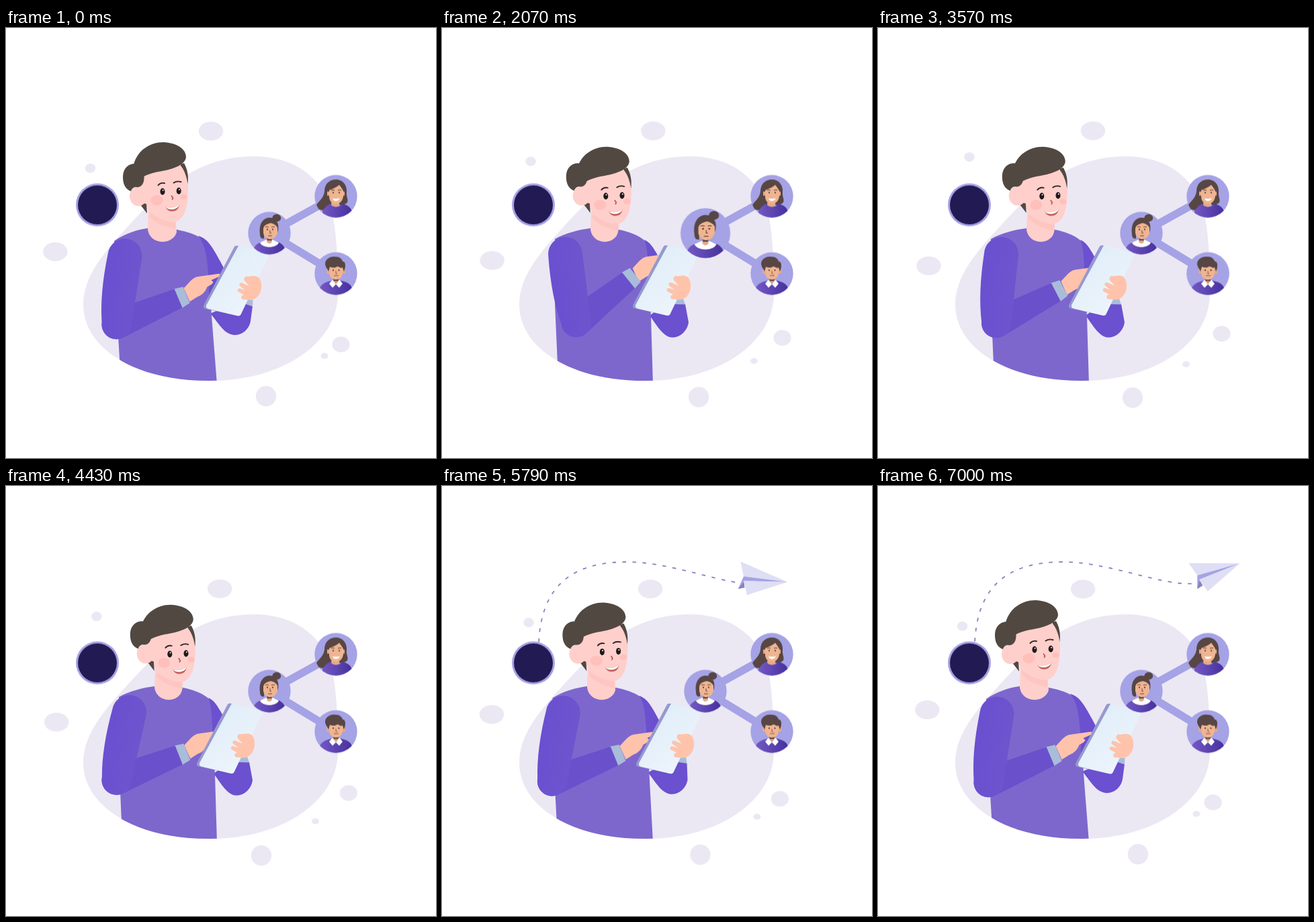
These frames come from a looping animation (640x640 px, 7.21 s). An HTML page:

```html
<!DOCTYPE html>
<html lang="en">
<head>
<meta charset="utf-8">
<title>Sharing</title>
<style>
html, body { margin: 0; width: 100%; height: 100%; overflow: hidden; background: #fff; }
svg { display: block; width: 100%; height: 100%; }
.bubble { animation: drift 3605ms cubic-bezier(.37, 0, .63, 1) infinite alternate; }
.pulse { animation: pulse 7210ms ease-in-out infinite; }
.dip { animation: dip 7210ms ease-in-out infinite; }
@keyframes drift { to { transform: translate(var(--x), var(--y)); } }
@keyframes pulse { 0%, 25.4%, 32.3%, 100% { transform: scale(1); } 28.8% { transform: scale(1.17); } }
@keyframes dip { 0%, 63%, 72.5%, 100% { transform: scale(1); } 67% { transform: scale(.93); } }
</style>
</head>
<body>
<svg viewBox="0 0 640 640">
  <defs>
    <path id="blob" d="M368 191C430 191 464 222 481 258C492 290 494 345 494 395C494 470 410 525 305 525C190 526 115 475 115 412C115 370 145 335 180 297C235 235 290 191 368 191Z"/>
    <clipPath id="floor"><use href="#blob"/><rect width="640" height="420"/></clipPath>
    <clipPath id="disc"><circle r="31.7"/></clipPath>
    <linearGradient id="shirt"><stop offset=".1" stop-color="#7055c2"/><stop offset="1" stop-color="#45309c"/></linearGradient>
    <linearGradient id="glass" x1="0" y1="0" x2=".7" y2="1"><stop offset="0" stop-color="#dcebf8"/><stop offset=".35" stop-color="#e3eff9"/><stop offset="1" stop-color="#edf4fc"/></linearGradient>
    <linearGradient id="sleeve"><stop offset="0" stop-color="#6a50d0"/><stop offset="1" stop-color="#6e54cd"/></linearGradient>
    <mask id="flown" maskUnits="userSpaceOnUse" x="0" y="0" width="640" height="640">
      <path id="reveal" fill="none" stroke="#fff" stroke-width="6"/>
    </mask>
  </defs>

  <g fill="#ebe8f4">
    <use href="#blob"/>
    <ellipse class="bubble" cx="73.3" cy="333" rx="18.2" ry="14" style="--x:2.2px;--y:21px"/>
    <ellipse class="bubble" cx="305" cy="153.5" rx="18.2" ry="14" style="--x:15px;--y:-.6px"/>
    <ellipse class="bubble" cx="125.5" cy="208.7" rx="7.8" ry="7" style="--x:10.5px;--y:-16.7px"/>
    <ellipse class="bubble" cx="498.5" cy="471" rx="13.1" ry="11.8" style="--x:13px;--y:-16px"/>
    <ellipse class="bubble" cx="474" cy="488" rx="5.6" ry="4.4" style="--x:-15.5px;--y:12.5px"/>
    <circle class="bubble" cx="387" cy="548" r="15.2" style="--x:-8px;--y:2.2px"/>
  </g>

  <path id="trail" d="M144 235C147 152 190 113 275 113C345 113 425 150 471 145" fill="none" stroke="#8583c3" stroke-width="1.8" stroke-dasharray="5.5 9.5" mask="url(#flown)"/>
  <g id="plane">
    <path fill="#dedef4" d="M5-31L74 1.5L9-9Z"/>
    <path fill="#a5a2e6" d="M9-9L74 1.5L9-2L0 9.5Z"/>
    <path fill="#8583c3" d="M0 9.5L10 8L9-2Z"/>
    <path fill="#dedef4" d="M9-2.5L74 1.5L13 19Z"/>
  </g>
  <g transform="translate(136 263.3)">
    <g class="dip"><circle r="32" fill="#a5a2e6"/><circle r="29" fill="#221a52"/></g>
  </g>

  <path id="farSleeve" fill="#6b50cf"/>
  <path id="farCuff" fill="#a9bcd9"/>
  <path id="torso" fill="#7d67cd" clip-path="url(#floor)"/>
  <path id="farShoulder" fill="#6b50cf"/>
  <path id="neck" fill="#ffcfcb"/>

  <g id="face">
    <path fill="#fdc6c1" d="M214 274C226 284 240 289 252 288L252 299C238 297 222 290 213 280Z"/>
    <path fill="#ffcfcb" d="M195 222L264 203C269 212 271.500 226 271 243C270.500 264 267 282 254 288C240 292 221 281 209 265L200 250Z"/>
  </g>
  <g id="nape">
    <path fill="#524842" d="M196 258L210 276L209 262Z"/>
    <ellipse cx="197" cy="250.500" rx="13" ry="14.500" fill="#ffcfcb"/>
    <path fill="#524842" d="M190 202C179 203 174 212 174 222C174 233 178 240 186 243C187 239 191 236 195 237C202 237 206 231 205.500 221L205 203Z"/>
  </g>
  <g id="features">
    <path fill="#524842" d="M190 203C196 182 214 170 234 170C256 171 268 181 268 192C267 205 245 211 226 214C217 216 210 218 205 221L194 222ZM260 203L265 201C270 210 272 220 270.500 232C269 222 266 212 260 205Z"/>
    <g fill="#ffbfbb"><ellipse cx="224.500" cy="256.500" rx="9" ry="7.500"/><ellipse cx="264.500" cy="251.500" rx="5.200" ry="4"/></g>
    <g fill="#1f1a1c"><ellipse cx="233" cy="243.500" rx="3.500" ry="5"/><ellipse cx="257.200" cy="242.500" rx="3.500" ry="5"/></g>
    <g fill="#fff"><circle cx="233.700" cy="241.500" r="1"/><circle cx="258" cy="240.500" r="1"/></g>
    <g fill="none" stroke="#2e2623" stroke-width="1.900" stroke-linecap="round">
      <path d="M226.500 234C229 231 232 230 236 231M249.500 230.500C253 228 257 228 260.500 229"/>
      <path stroke="#c0574f" stroke-width="1.800" d="M246.500 250L248.500 253L247.500 255"/>
    </g>
    <path fill="#c4655f" d="M237.500 266C244 269 252 267 257.500 263C258 269 253 273 247 273C242 273 239 270 237.500 266Z"/>
    <path fill="#fff" d="M237.500 266C244 269 252 267 257.500 263C257 267 253 269.500 247 270C242 270 239 268.500 237.500 266Z"/>
  </g>

  <path id="hand" fill="#ffc3ab" d="M-4-10C4-18 8-25 16-27L48-31.500C52-31 51-28 47-26.500L37-22L40-19C38-15 34-14 31-12C28-4 22 1 16 3L5 10Z"/>
  <g id="forearm">
    <path fill="#a9bcd9" d="M99-15.500L113-13V13L99 15.500Z"/>
    <path fill="#6b50cc" d="M0-22L100-15V15L0 22A22 22 0 0 1 0-22Z"/>
  </g>
  <path id="upperArm" fill="url(#sleeve)" d="M-25.500 0A25.500 25.500 0 0 1 25.500 0L22 103A22 22 0 0 1-22 103Q-30.500 60-25.500 0Z"/>

  <g id="phone" stroke-linejoin="round" stroke-width="8">
    <path fill="#9599cf" stroke="#9599cf" d="M343 328L384 338L344 424L298 414Z"/>
    <path fill="url(#glass)" stroke="url(#glass)" d="M348.500 328L387 338L346 424.500L302 414Z"/>
    <path fill="#ffc3ab" d="M368 369C376 368 381 375 380 387C379 397 372 405 363 405L352 404C349 402 350 398 354 397L346 393C343 390 345 387 349 388L356 390L348 384C346 380 349 378 353 380L362 384L355 376C353 372 357 368 360 370Z" stroke="none"/>
  </g>

  <path d="M491 250.500L392 305.300L491 365.500" fill="none" stroke="#a5a2e6" stroke-width="11.500"/>

  <g transform="translate(491 250.500)"><g class="pulse" style="animation-delay:880ms">
    <circle r="31.700" fill="#a5a2e6"/>
    <g clip-path="url(#disc)">
      <path fill="#574643" d="M-17-7C-17-20-8-25 0-25C10-25 17-17 16-6C15 0 19 5 17 9C14 13 8 13 0 13C-6 20-20 24-30 17C-29 8-19 6-17-7Z"/>
      <path fill="url(#shirt)" d="M-21 26C-18 16-12 13-8 11C-4 17 6 17 9 11C16 13 22 15 24 23V34H-21Z"/>
      <path fill="#e5aa88" d="M-5 4H5V11C8 17-8 17-7 11ZM-13-7H13V-1H-13Z"/>
      <path fill="#efb491" d="M-10-9C-3-12 2-14 5-17C8-13 10-10 11-8V0C10 8 5 11 0 11C-6 11-10 7-10 0Z"/>
      <path fill="#fff" d="M-5 3Q0 4 6 3Q4 7 0 7T-5 3Z"/>
      <g fill="#3d302d"><circle cx="-4" cy="-5.500" r="1.100"/><circle cx="5" cy="-5.500" r="1.100"/></g>
      <path fill="none" stroke="#523d35" d="M-7-9Q-5-10-2-9M3-9Q6-10 8-9"/>
    </g>
  </g></g>

  <g transform="translate(491 365.500)"><g class="pulse" style="animation-delay:1710ms">
    <circle r="31.700" fill="#a5a2e6"/>
    <g clip-path="url(#disc)">
      <path fill="url(#shirt)" d="M-25 26C-24 14-12 12-5 10H5C14 12 24 14 25 26V34H-25Z"/>
      <path fill="#fff" d="M-6 10H6L10 15L5 21L0 16L-5 21L-10 15Z"/>
      <path fill="#d99e7d" d="M-4 4H4V11L0 16L-4 11Z"/>
      <path fill="#574643" d="M-5 7H5L3 11H-3Z"/>
      <path fill="#e5aa88" d="M-14-6H14V0H-14Z"/>
      <path fill="#efb491" d="M-10-14H10V0C9 6 5 9 0 9S-9 6-10 0Z"/>
      <path fill="#574643" d="M-11-3C-12-7-15-8-16-14C-16-22-8-26-1-25C6-26 10-20 10-18C15-18 15-10 12-3L10-9C6-7 4-12 1-10C-2-8-6-9-9-10Z"/>
      <g fill="#3d302d"><circle cx="-4" cy="-5" r="1.100"/><circle cx="4.500" cy="-5" r="1.100"/></g>
      <path fill="none" stroke="#8d5947" d="M-3 3H4M0-4V0H2"/>
    </g>
  </g></g>

  <g transform="translate(392 305.300)"><g class="pulse">
    <circle r="31.700" fill="#a5a2e6"/>
    <g clip-path="url(#disc)">
      <path fill="url(#shirt)" d="M-24 26C-22 15-12 13-5 11H5C14 13 21 15 24 26V34H-24Z"/>
      <path fill="#fff" d="M-5 10H5L14 14C11 23-11 23-14 14Z"/>
      <path fill="#e5aa88" d="M-4 4H4V13Q0 18-4 13Z"/>
      <path fill="#574643" d="M-4 7H5L3 11H-3ZM5-19C2-27 11-31 16-26C20-20 14-16 7-17ZM-14 1C-16-14-9-23 0-23C10-23 15-15 13-4L11 1H-8V8C-13 9-14 5-14 1Z"/>
      <path fill="#efb491" d="M-9-7C-8-12-3-14 2-15C7-14 11-11 12-8V0C10 6 6 9 1 9S-8 5-9 0Z"/>
      <g fill="#3d302d"><circle cx="-3" cy="-5.500" r="1.100"/><circle cx="5" cy="-5.500" r="1.100"/></g>
      <path fill="none" stroke="#6b4538" d="M-6-9Q-4-10-1-9M3-9Q6-10 8-9M-2 4H4M1-4V0H3"/>
    </g>
  </g></g>
</svg>

<script>
const LOOP = 7210;
const el = id => document.getElementById(id);
const place = (id, transform) => el(id).setAttribute('transform', transform);
const mix = (a, b, k) => a + (b - a) * k;
const ramp = (t, from, to) => Math.min(1, Math.max(0, (t - from) / (to - from)));
const sine = (t, from, to) => (1 - Math.cos(Math.PI * ramp(t, from, to))) / 2;
const radians = deg => deg * Math.PI / 180;

// Each outline: upright, then leaning back; both have the same path commands.
const outlines = {
  torso: [
    'M221 298 C205 300 184 305 168 314 L168 410 L173.3 530 L314 530 L311 430 C309 380 308 345 306 322 C300 311 280 303 262 300 Z',
    'M211 298 C195 300 177 306 161 317 L164 410 L171.3 530 L314 530 L306 428 C304 380 301 345 299 320 C290 309 270 303 253 300 Z'],
  farShoulder: [
    'M301 315 C311 320 314 326 325 345 L312 400 L307 400 L308 380 C307 350 306 325 301 315 Z',
    'M286 309 C302 315 306 323 330 368 L312 400 L302 400 L302 380 C300 350 299 325 286 309 Z'],
  farSleeve: [
    'M309 428 C318 440 326 454 336 459 C350 465 365 453 367 438 L362 411 L343 408 L320 420 Z',
    'M304 425 C315 437 322 452 335 456 C348 460 362 450 364 436 L367 414 L350 405 L320 418 Z'],
  farCuff: [
    'M346 402 L359 403 L362 411.5 L344 411 Z',
    'M356 403 L367.5 405 L367 414.5 L354 410 Z'],
  neck: [
    'M222 272 L221 300 C224 323 257 324 262 304 L262 286 Z',
    'M212 266 L211 300 C214 323 248 324 254 304 L252 280 Z']
};

function blend([a, b], k) {
  const ends = b.match(/[\d.]+/g);
  let i = 0;
  return a.replace(/[\d.]+/g, n => mix(+n, +ends[i++], k).toFixed(2));
}

function drawBody(t) {
  const lean = 1 - sine(t, 0, 860) + sine(t, 5080, 6500);
  const swing = 1 - sine(t, 0, 800) + sine(t, 1770, 4770);
  const shift = (id, x, y) => place(id, `translate(${x * (1 - lean)} ${y * (1 - lean)})`);
  for (const id in outlines) el(id).setAttribute('d', blend(outlines[id], lean));
  // The front of the head dips further than the back, which reads as a nod.
  shift('nape', 10.8, -.8);
  shift('face', 10.8, 3);
  shift('features', 10.8, 6.8);
  shift('phone', -10, -.5);

  const shoulder = [mix(183.5, 177, lean), mix(336.5, 339, lean)];
  const upper = mix(9.5, -11.3, swing) + 4.3 * lean;
  const fore = mix(-39.2, -21.3, swing) - 1.6 * lean * swing;
  const elbow = [shoulder[0] + 103 * Math.sin(radians(upper)), shoulder[1] + 103 * Math.cos(radians(upper))];
  const wrist = [elbow[0] + 113 * Math.cos(radians(fore)), elbow[1] + 113 * Math.sin(radians(fore))];
  place('upperArm', `translate(${shoulder}) rotate(${-upper})`);
  place('forearm', `translate(${elbow}) rotate(${fore})`);
  place('hand', `translate(${wrist})`);
}

const trail = el('trail');
const trailLength = trail.getTotalLength();
el('reveal').setAttribute('d', trail.getAttribute('d'));

function drawPlane(t) {
  const start = 4610;
  const shown = t > start ? 'visible' : 'hidden';
  trail.style.visibility = el('plane').style.visibility = shown;
  const flown = trailLength * (1 - (1 - ramp(t, start, 6790)) ** 3.3);
  const tail = trail.getPointAtLength(flown);
  const turn = -60 * (1 - sine(t, start, 5060)) - 25 * sine(t, 5600, 6700);
  place('plane', `translate(${tail.x} ${tail.y}) rotate(${turn}) scale(${sine(t, start, 4920)})`);
  // Dashes are counted back from the plane, so they travel with it.
  trail.setAttribute('stroke-dashoffset', 10 - flown % 15);
  el('reveal').setAttribute('stroke-dasharray', `${flown} ${trailLength + 10}`);
}

let began;
function tick(now) {
  began ??= now;
  const t = (now - began) % LOOP;
  drawBody(t);
  drawPlane(t);
  requestAnimationFrame(tick);
}
drawBody(0);
drawPlane(0);
requestAnimationFrame(tick);
</script>
</body>
</html>
```
